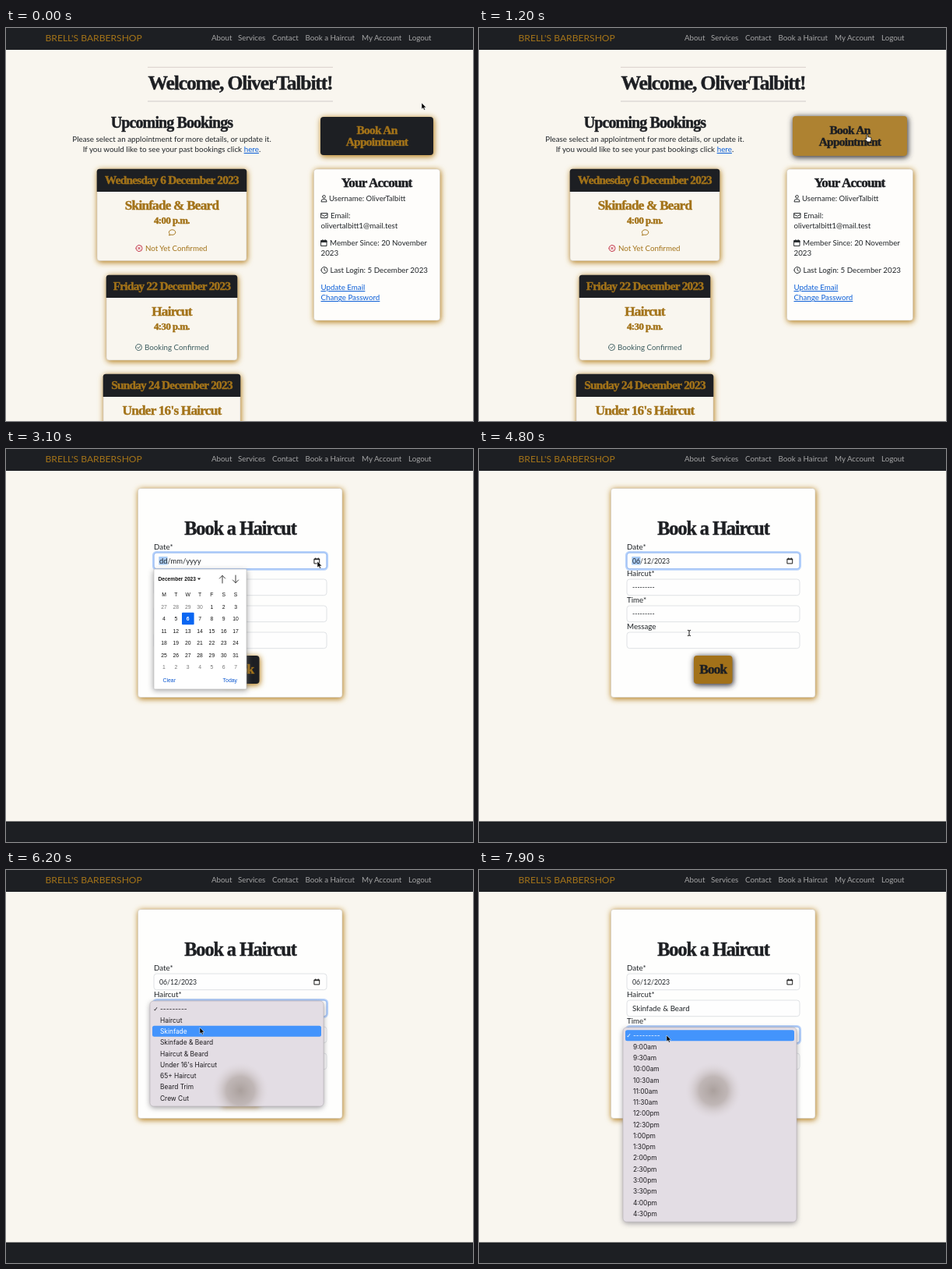
These frames come from a looping animation (600x504 px, 8000 ms). An HTML page:

```html
<!DOCTYPE html>
<html lang="en">
<head>
<meta charset="utf-8">
<title>Booking a haircut</title>
<style>
  html, body { margin: 0; width: 100%; height: 100%; overflow: hidden; background: #f9f6ef; }
  svg { display: block; width: 600px; height: 504px; }
  text { white-space: pre; }
  .body { font-family: Lato, sans-serif; }
  .head { font-family: "Liberation Serif", serif; font-weight: 700; letter-spacing: -.045em; stroke: currentColor; stroke-width: .45px; }
  .ui { font-family: "Liberation Sans", sans-serif; }
  .menu { font-family: Inter, sans-serif; }
  .check { font-family: "DejaVu Sans", sans-serif; }
  .line { fill: none; stroke-width: .95; stroke-linecap: round; stroke-linejoin: round; }
  .link { fill: #0b5ed7; text-decoration: underline; }
</style>
</head>
<body>
<svg id="stage" viewBox="0 0 600 504"></svg>
<script>
const LOOP = 8000, INK = '#212529', DARK = '#1d1f23', GOLD = '#a37319', GLOW = '#b98527';
const PAPER = '#f9f6ef', RED = '#c22f45', TEAL = '#3c5c5f', ROW = 14.28;

// ---- markup helpers ----
const rect = (x, y, w, h, fill, r = 0, more = '') =>
  `<rect x="${x}" y="${y}" width="${w}" height="${h}" rx="${r}" fill="${fill}" ${more}/>`;
const text = (x, y, s, size = 9.75, o = {}) =>
  `<text x="${x}" y="${y}" font-size="${size}" class="${o.font || 'body'}" text-anchor="${o.at || 'start'}" ` +
  `${o.fill === null ? '' : `fill="${o.fill || INK}"`} ${o.more || ''}>${s}</text>`;
const head = (x, y, s, size, color = DARK) =>
  text(x, y, s, size, { font: 'head', at: 'middle', fill: color, more: `color="${color}"` });
const group = (id, inner, more = '') => `<g id="${id}" ${more}>${inner}</g>`;
const line = (d, color, x = 0, y = 0) =>
  `<path class="line" d="${d}" stroke="${color}" transform="translate(${x} ${y})"/>`;
const glow = (x, y, w, h, color = GLOW) =>
  rect(x, y + .5, w + 1.5, h + 2, color, 5, 'filter="url(#soft)"');
const ring = 'M-4 0A4 4 0 1 1 4 0A4 4 0 1 1 -4 0';

function card(x, y, w, h, fill) {
  return glow(x, y, w, h) + rect(x, y, w, h, fill, 3.5, 'stroke="#cfc8bc" stroke-width=".6"');
}

function button(id, x, y, w, h, lines, size, grow) {
  const face = (bg, ink, shade, g) =>
    glow(x - g, y - g, w + 2 * g, h + 2 * g, shade) +
    rect(x - g, y - g, w + 2 * g, h + 2 * g, bg, 4) +
    lines.map(([s, by]) => head(x + w / 2, by, s, size, ink)).join('');
  return group(id + 'Off', face(DARK, GOLD, GLOW, 0)) +
         group(id + 'On', face(grow ? '#ae8231' : '#a27119', DARK, '#3a393c', grow));
}

function booking(x, y, w, h, date, cut, time) {
  const mid = x + w / 2;
  return card(x, y, w, h, PAPER) +
    `<path d="M${x - .3} ${y + 29}v-25.8q0 -3.5 3.5 -3.5h${w - 6.4}q3.5 0 3.5 3.5v25.8z" fill="${DARK}"/>` +
    head(mid, y + 19, date, 15.2, GOLD) + head(mid, y + 51.5, cut, 17.2, GOLD) +
    head(mid, y + 70, time, 12.9, GOLD);
}

// ---- account page ----
function account() {
  return rect(182, 49.8, 238, 1, '#d9cfca') + rect(182, 93.5, 238, 1, '#cfccc9') +
    head(301, 79, 'Welcome, OliverTalbitt!', 25.6) +
    head(213, 128, 'Upcoming Bookings', 20) +
    text(213, 146, 'Please select an applointment for more details, or update it.', 9.85, { at: 'middle' }) +
    text(213, 159, 'If you would like to see your past bookings click <tspan class="link">here</tspan>.', 9.85, { at: 'middle' }) +
    booking(117, 181, 192, 117.5, 'Wednesday 6 December 2023', 'Skinfade &amp; Beard', '4:00 p.m.') +
    line('M-3.2 3.2L-2.7 1.6A4.2 3.3 0 1 1 -1 2.6Q-2 3.4 -3.2 3.2Z', GOLD, 213, 262.5) +
    line(ring + 'M-1.4 -1.4L1.4 1.4M1.4 -1.4L-1.4 1.4', RED, 171, 282.5) +
    text(179, 286, 'Not Yet Confirmed', 9.75, { fill: GOLD }) +
    booking(129, 317, 168, 109, 'Friday 22 December 2023', 'Haircut', '4:30 p.m.') +
    line(ring + 'M-1.7 .1L-.5 1.4L1.8 -1.3', TEAL, 170.5, 409.5) +
    text(178, 413, 'Booking Confirmed', 9.75, { fill: TEAL }) +
    booking(125, 444, 176, 117, 'Sunday 24 December 2023', "Under 16's Haircut", '') +
    button('visit', 404, 114, 145, 49, [['Book An', 136], ['Appointment', 151.3]], 15.4, 1) +
    card(395.5, 181, 162, 194, '#fefdfb') +
    head(476, 204, 'Your Account', 17.1) +
    line('M-1.8 -2.2A1.8 1.8 0 1 1 1.8 -2.2A1.8 1.8 0 1 1 -1.8 -2.2M-3.5 4Q-3.5 1 -1 1H1Q3.5 1 3.5 4Z', INK, 408.5, 218.5) +
    text(415, 222, 'Username: OliverTalbitt', 9.65) +
    line('M-4 -3H4V3H-4ZM-4 -1.6L0 1L4 -1.6', INK, 409, 240.5) +
    text(417, 244, 'Email:') + text(404.5, 257, 'olivertalbitt1@mail.test') +
    line('M-3.5 -3H3.5V4H-3.5ZM-3.5 -2H3.5M-3.5 -1H3.5M-1.6 -4V-3M1.6 -4V-3', INK, 408.5, 275.5) +
    text(416, 279, 'Member Since: 20 November') + text(404.5, 292, '2023') +
    line(ring + 'M0 -2.2V0L1.5 1.1', INK, 409, 310.5) +
    text(416.5, 314, 'Last Login: 5 December 2023') +
    text(404.5, 336, '<tspan class="link">Update Email</tspan>') +
    text(404.5, 349, '<tspan class="link">Change Password</tspan>');
}

// ---- booking form ----
function field(id, y, label, value) {
  return text(190, y - 4, label) +
    rect(190, y, 222, 20.7, '#fefefe', 3.5, 'stroke="#dcdfe3" stroke-width=".9"') +
    group(id + 'Focus', rect(189.2, y - .8, 223.6, 22.3, 'none', 4.2, 'stroke="#b9d3fb" stroke-width="2.6"') +
      rect(190, y, 222, 20.7, 'none', 3.5, 'stroke="#86b0f3" stroke-width=".7"')) + value;
}

function form() {
  const dashes = text(197, 180.3, '---------', 8.6);
  return rect(0, 477.5, 600, 27, DARK) + card(169.5, 50.5, 262.5, 268, '#fefefd') +
    head(301, 110, 'Book a Haircut', 24.3) +
    field('date', 133, 'Date*',
      group('datePick', rect(196.3, 138, 11.2, 10.5, '#a8cbf6')) +
      group('dateEmpty', text(197, 147, 'dd/mm/yyyy', 9.4)) +
      group('dateSet', text(197, 147, '06/12/2023', 8.7)) +
      line('M-3.2 -2.6H3.2V3.4H-3.2ZM-3.2 -1.8H3.2M-1.7 -3.6V-2.6M1.7 -3.6V-2.6', '#111', 399.5, 143.5)) +
    field('cut', 167, 'Haircut*',
      group('cutEmpty', dashes) + group('cutSet', text(197, 180.5, 'Skinfade &amp; Beard'))) +
    field('time', 201, 'Time*', `<g transform="translate(0 34)">${dashes}</g>`) +
    field('note', 235, 'Message', '') +
    button('book', 276, 265, 49.5, 36, [['Book', 288]], 17.2, 0);
}

function calendar() {
  const at = (i, y, s, fill, more = '') => text(203 + 15.35 * i, y, s, 6.8, { font: 'ui', at: 'middle', fill, more });
  let s = rect(189, 156, 121, 154, '#6c6c70', 2, 'filter="url(#soft)" opacity=".6"') +
    rect(190, 154, 119, 154, '#fff', 1, 'stroke="#b9b9bb" stroke-width=".6"') +
    text(195.5, 169, 'December 2023', 6.6, { font: 'ui', fill: '#111', more: 'font-weight="700"' }) +
    '<path d="M245.8 165.4h4.4l-2.2 2.7z" fill="#222"/>' +
    line('M0 5V-4.5M-3.6 -1L0 -4.7L3.6 -1', '#333', 278, 167) +
    line('M0 -5V4.5M-3.6 1L0 4.7L3.6 1', '#333', 295, 167) +
    rect(226, 209.8, 15.6, 15.5, '#0a66f2', 1);
  [...'MTWTFSS'].forEach((d, i) => s += at(i, 189, d, '#111'));
  for (let i = 0; i < 42; i++) {
    const d = i - 3, out = d < 1 || d > 31;
    const n = d < 1 ? d + 30 : d > 31 ? d - 31 : d;
    s += at(i % 7, 205 + 15.4 * Math.floor(i / 7), n, d === 6 ? '#fff' : out ? '#777' : '#111', d === 6 ? 'font-weight="700"' : '');
  }
  return s + text(201.5, 299, 'Clear', 6.9, { font: 'ui', fill: '#0b57d0' }) +
    text(297, 299, 'Today', 6.9, { font: 'ui', fill: '#0b57d0', at: 'end' });
}

function menu(id, y, items) {
  const h = items.length * ROW + 6.5;
  return rect(185, y + 2, 223, h, '#77747a', 5, 'filter="url(#soft)" opacity=".7"') +
    rect(185, y, 223, h, '#e3dde4', 4.5, 'stroke="#b7b1b8" stroke-width=".6"') +
    group(id + 'Spot', '<circle cx="301" cy="283" r="36" fill="url(#spot)"/>', `clip-path="inset(0 0 ${Math.max(0, 319 - y - h)}px 0)"`) +
    items.map((s, i) => {
      const top = y + 3.2 + i * ROW;
      return `<g class="${id}Row">` + rect(188, top, 217, 14, '#4394fc', 2.5) +
        (i ? '' : text(189.3, top + 10, '✓', 7.8, { font: 'check', fill: null })) +
        text(198, top + 10.2, s, 8.4, { font: 'menu', fill: null }) + '</g>';
    }).join('');
}

const cuts = ['---------', 'Haircut', 'Skinfade', 'Skinfade &amp; Beard', 'Haircut &amp; Beard',
  "Under 16's Haircut", '65+ Haircut', 'Beard Trim', 'Crew Cut'];
const times = ['---------'];
for (let m = 540; m <= 990; m += 30) {
  const hour = Math.floor(m / 60);
  times.push(`${hour > 12 ? hour - 12 : hour}:${m % 60 ? '30' : '00'}${hour < 12 ? 'am' : 'pm'}`);
}

const links = [[264, 'About'], [298, 'Services'], [342, 'Contact'], [384.5, 'Book a Haircut'], [457, 'My Account'], [517, 'Logout']];
const stage = document.getElementById('stage');
stage.innerHTML =
  `<defs><filter id="soft" x="-40%" y="-40%" width="180%" height="180%"><feGaussianBlur stdDeviation="3.8"/></filter>
   <radialGradient id="spot"><stop offset="0" stop-color="#9c918b" stop-opacity=".8"/>
   <stop offset=".5" stop-color="#aa9f9a" stop-opacity=".62"/><stop offset="1" stop-color="#d8cfd2" stop-opacity="0"/></radialGradient></defs>` +
  rect(0, 0, 600, 504, PAPER) + group('account', account()) + group('form', form()) +
  group('calendar', calendar()) + group('cutMenu', menu('cut', 168, cuts)) + group('timeMenu', menu('time', 202, times)) +
  rect(0, 0, 600, 28, DARK) + text(50.5, 16.5, "BRELL'S BARBERSHOP", 12.1, { fill: GOLD }) +
  links.map(([x, s]) => text(x, 15.7, s, 9.75, { fill: '#a5a5a6' })).join('') +
  group('cursor',
    group('arrow', '<path d="M0 0V8L1.9 6.4L3.2 9.2L4.5 8.6L3.3 5.9H5.8Z" fill="#000" stroke="#fff" stroke-width=".5"/>') +
    group('hand', '<path d="M-1 0Q0 -1 .8 0V3Q1.8 2.3 2.3 3.1Q3.2 2.5 3.8 3.4Q4.8 3.1 4.9 4.2V6Q4.6 8 3.8 9H-.2Q-1.5 7 -3 5.4Q-2.6 4.2 -1 5.2Z" fill="#fff" stroke="#000" stroke-width=".8"/>') +
    group('beam', line('M-1.6 -3.6Q0 -3.6 0 -2.6V2.6Q0 3.6 -1.6 3.6M1.6 -3.6Q0 -3.6 0 -2.6M0 2.6Q0 3.6 1.6 3.6', '#111')));

// ---- motion ----
const path = [[0, 534, 96], [300, 534, 96], [1000, 499, 137], [1900, 499, 137], [2500, 400, 144], [3400, 400, 144],
  [4000, 233, 216], [4300, 233, 216], [4550, 292, 272], [4650, 292, 272], [4800, 270, 236], [5300, 262, 177],
  [5600, 262, 177], [6150, 249, 202], [6500, 249, 202], [6850, 246, 217], [7150, 246, 217], [7500, 241, 212], [8000, 241, 212]];
const $ = id => document.getElementById(id);
const clamp = v => Math.min(1, Math.max(0, v));
const ramp = (t, a, b) => clamp((t - a) / (b - a));
const show = (id, on) => $(id).style.display = on ? '' : 'none';
const fade = (id, v) => { $(id).style.opacity = v; show(id, v > 0); };

function pointer(t) {
  const i = path.findIndex((p, k) => k && t <= p[0]);
  const [a, b] = [path[i - 1], path[i]];
  const u = ramp(t, a[0], b[0]), e = u * u * (3 - 2 * u);
  return [a[1] + (b[1] - a[1]) * e, a[2] + (b[2] - a[2]) * e];
}

function pick(id, row) {
  document.querySelectorAll('.' + id + 'Row').forEach((g, i) => {
    g.setAttribute('fill', i === row ? '#fff' : '#1c1a1e');
    g.firstChild.style.display = i === row ? '' : 'none';
  });
}

function hover(id, v) {
  fade(id + 'Off', v < 1 ? 1 : 0);
  fade(id + 'On', v);
}

function draw(t) {
  const [x, y] = pointer(t), onForm = t >= 1600, dated = t >= 4300, chosen = t >= 7200;
  show('account', !onForm);
  show('form', onForm);
  hover('visit', ramp(t, 600, 900));
  hover('book', Math.min(ramp(t, 4400, 4550), 1 - ramp(t, 4800, 5050)));

  show('dateFocus', t >= 2600 && t < 5500);
  show('datePick', t >= 2600 && t < 5500);
  show('dateEmpty', !dated);
  show('dateSet', dated);
  show('calendar', t >= 2600 && !dated);
  show('cutFocus', t >= 5500 && t < 7700);
  show('cutEmpty', !chosen);
  show('cutSet', chosen);
  show('timeFocus', t >= 7700);
  show('noteFocus', false);

  const closing = ramp(t, 7000, 7300);
  fade('cutMenu', t >= 5500 && !chosen ? 1 - closing : 0);
  show('cutSpot', closing === 0);
  pick('cut', Math.max(0, Math.floor((y - 171) / ROW)));
  show('timeMenu', t >= 7800);
  pick('time', 0);

  const onVisit = !onForm && y > 114;
  const onBook = dated && t < 5000 && y > 264 && x > 276;
  const typing = dated && t < 5200 && y > 231 && y < 257;
  show('hand', onVisit || onBook);
  show('beam', typing);
  show('arrow', !(onVisit || onBook || typing));
  $('cursor').setAttribute('transform', `translate(${x} ${y})`);
}

// The screen advances ten times a second.
function tick() {
  draw(Math.floor(performance.now() % LOOP / 100) * 100);
  requestAnimationFrame(tick);
}
tick();
</script>
</body>
</html>
```
